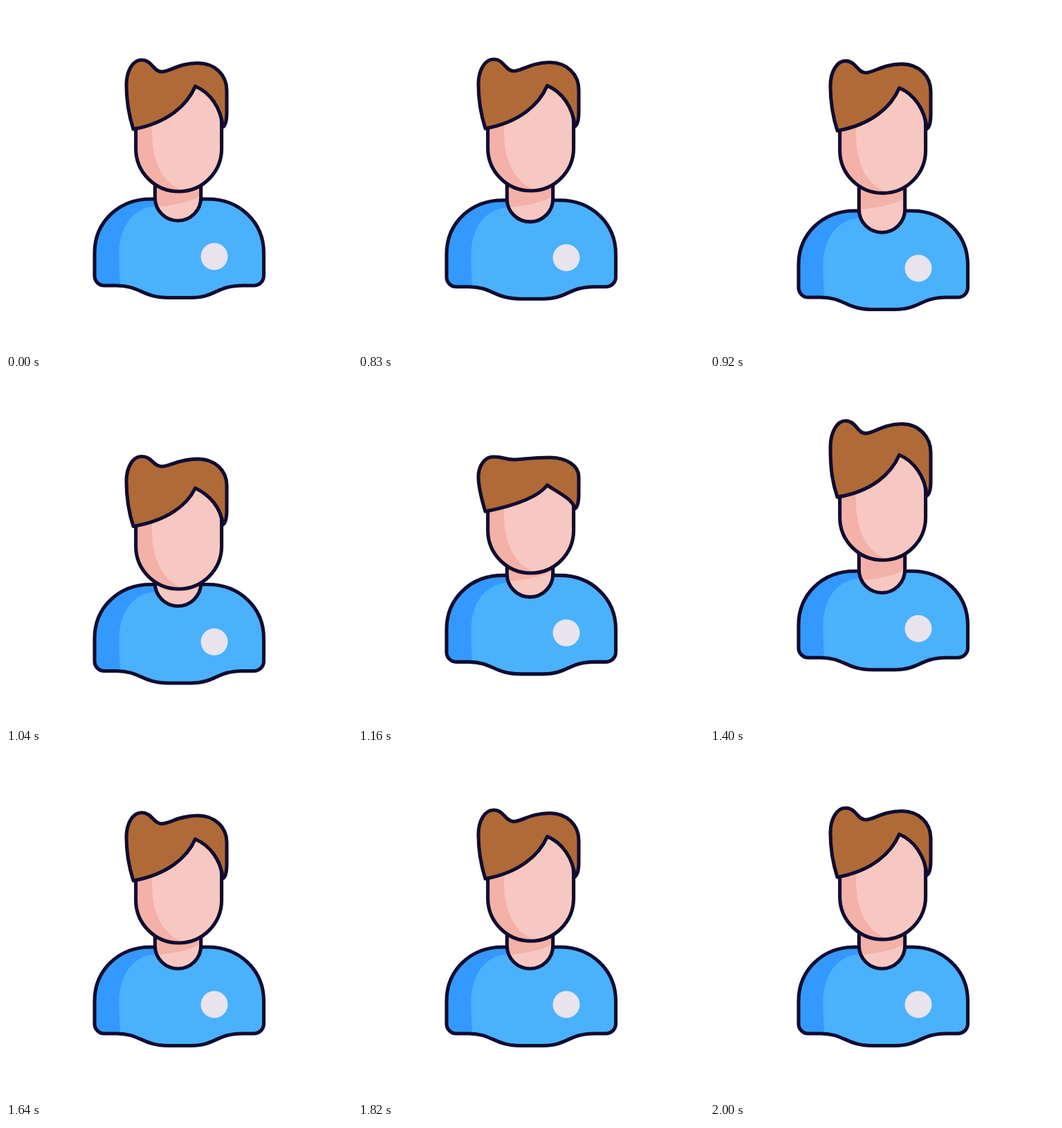
Recreate the animation shown at these times as an HTML page. Size 500 px wide and 500 px high, loop 2.63 s.

```html
<!DOCTYPE html>
<html lang="en">
<head>
<meta charset="utf-8">
<title>Bobbing avatar</title>
<style>
  html, body { margin: 0; width: 100%; height: 100%; overflow: hidden; background: #fff; }
  svg { display: block; width: 100%; height: 100%; }
  .line { fill: none; stroke: #100c30; stroke-width: 5.1; stroke-linejoin: round; stroke-linecap: round; }
  .shirt { fill: #4ab1fd; }
  .shirt-shade { fill: #3399ff; }
  .skin { fill: #f7c8c1; }
  .skin-shade { fill: #f4b1a8; }
  .hair { fill: #b06a37; }
  .badge { fill: #e9e4ee; }
</style>
</head>
<body>
<svg viewBox="0 0 500 500">
  <defs>
    <path id="torso" d="M128 357V390A14 14 0 0 0 142 404H160C194 404 197 421.500 235 421.500H267C303 421.500 304 404 342 404H358A14.500 14 0 0 0 372.500 390V357C372.500 312 337 279 292 279H209C163 279 128 312 128 357Z"/>
    <path id="neckShape" d="M215.300 225V277A33.200 33.200 0 0 0 281.700 277V225Z"/>
    <path id="faceShape" d="M187.600 170V206A62 62 0 0 0 311.600 206V170A62 62 0 0 0 187.600 170Z"/>
    <clipPath id="inTorso"><use href="#torso"/></clipPath>
    <clipPath id="inNeck"><use href="#neckShape"/></clipPath>
    <clipPath id="inFace"><use href="#faceShape"/></clipPath>
  </defs>
  <g id="body">
    <use href="#torso" class="shirt"/>
    <path class="shirt-shade" clip-path="url(#inTorso)" d="M120 410H166C164 392 163.500 374 163.500 357C164 318 184 290 220 289V270H120Z"/>
    <use href="#torso" class="line"/>
    <circle class="badge" cx="301" cy="362" r="19.500"/>
    <use href="#neckShape" class="skin"/>
    <g clip-path="url(#inNeck)">
      <path id="neckShade" class="skin-shade" d="M210 220H290V269C272 283 246 288 210 291Z"/>
    </g>
    <use href="#neckShape" class="line"/>
  </g>
  <g id="head">
    <use href="#faceShape" class="skin"/>
    <path class="skin-shade" clip-path="url(#inFace)" d="M180 120H211V182C211 228 228 258 259 268V280H180Z"/>
    <use href="#faceShape" class="line"/>
    <path id="hairFill" class="hair"/>
    <path id="hairLine" class="line"/>
  </g>
</svg>
<script>
const LOOP = 2630, START = 830, END = 2000, STEP = 30;
const $ = id => document.getElementById(id);

// Each track is a list of [time in ms, value].
const bodyTrack = [[800, 0], [960, 20], [1280, -4], [1600, 0]];
const headTrack = [[800, 0], [880, -3], [1040, 34], [1280, -12], [1640, 5], [1980, 0]];
const squashTrack = [[980, 0], [1160, 1], [1400, 0], [1640, 0.08], [1980, 0]];
const liftTrack = [[880, 0], [1040, -7], [1160, 0], [1400, -11.2], [1640, 0]];

function valueAt(track, time) {
  if (time <= track[0][0]) return track[0][1];
  for (let i = 1; i < track.length; i++) {
    const [t0, a] = track[i - 1], [t1, b] = track[i];
    if (time < t1) {
      const eased = (1 - Math.cos(Math.PI * (time - t0) / (t1 - t0))) / 2;
      return a + (b - a) * eased;
    }
  }
  return track[track.length - 1][1];
}

function hairPath(squash, lift) {
  const tuft = 78 + 22 * squash + lift;
  const dip = 95 + 9 * squash + 0.9 * lift;
  const crown = 82.5 + 18.5 * squash + lift;
  const part = 116 + 25 * squash;
  const left = 114 + 15 * squash + 0.8 * lift;
  const right = 122 + 7 * squash + 0.8 * lift;
  const corner = 178 + squash + 0.1 * lift;
  const between = (a, b) => a + (b - a) * 0.56;
  return `M184 ${corner}C177 156 174 138 174 ${left}
    C174 ${between(left, tuft)} 183 ${tuft} 196 ${tuft}
    C211 ${tuft} 213 ${dip} 225 ${dip}
    C236 ${dip} 250 ${crown} 277 ${crown}
    C302 ${crown} 319 ${between(right, crown)} 319 ${right}
    V154C319 164 318 172 313.500 175
    C310.500 ${147 + 15 * squash} 295 ${part + 9 + 5 * squash} 273.500 ${part}
    C262 ${143 + 13 * squash} 234 169 184 ${corner}Z`;
}

const shift = (id, y) => $(id).setAttribute("transform", `translate(0 ${y})`);

function draw(now) {
  const t = now % LOOP;
  const moving = t >= START && t < END;
  const time = moving ? START + Math.floor((t - START) / STEP) * STEP : 0;
  const bodyY = valueAt(bodyTrack, time);
  shift("body", bodyY);
  shift("neckShade", -0.8 * bodyY);
  shift("head", valueAt(headTrack, time));
  const d = hairPath(valueAt(squashTrack, time), valueAt(liftTrack, time));
  $("hairFill").setAttribute("d", d);
  $("hairLine").setAttribute("d", d);
}

function tick() {
  draw(performance.now());
  requestAnimationFrame(tick);
}
tick();
</script>
</body>
</html>
```
